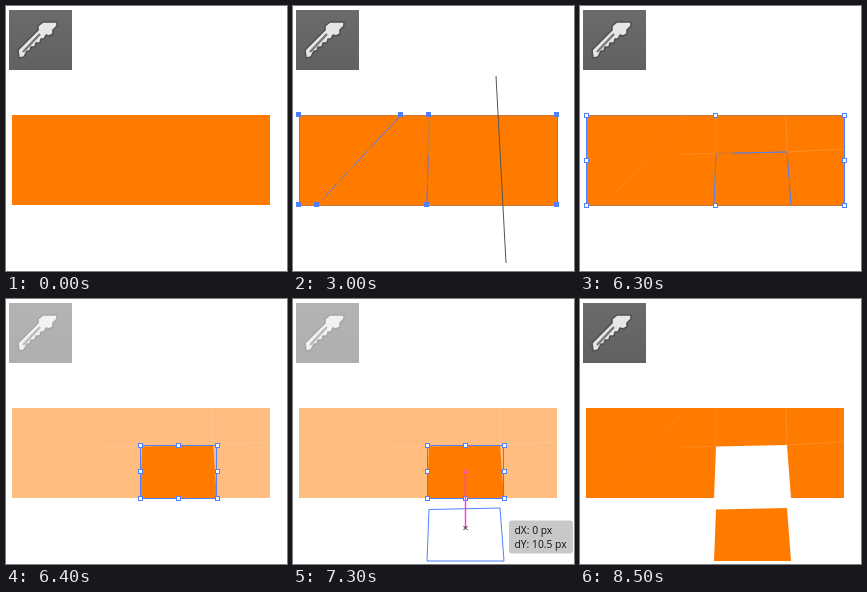
An HTML page for the animation above (9.1 s loop, 281 px wide and 265 px high).

```html
<!DOCTYPE html>
<html lang="en">
<head>
<meta charset="utf-8">
<title>Knife tool</title>
<style>
  html, body { margin: 0; width: 100%; height: 100%; overflow: hidden; background: #fff; }
  svg { display: block; width: 100%; height: 100%; }
  text { font: 10.3px "Open Sans", "Noto Sans", sans-serif; fill: #111; }
</style>
</head>
<body>
<svg id="stage" viewBox="0 0 281 265">
  <defs>
    <linearGradient id="panel" x1="0" y1="0" x2="0" y2="1">
      <stop offset="0" stop-color="#6b6b6b"/>
      <stop offset="1" stop-color="#616161"/>
    </linearGradient>
  </defs>
  <g id="icon">
    <rect x="3" y="4" width="63" height="60" fill="url(#panel)" shape-rendering="crispEdges"/>
    <g stroke-linejoin="round">
      <path id="knife" d="M37 16H51V20L47 24V28L43 30L40 29L38 33L35 33L34 37L30 37L29 41L25 41L24 45L21 45L18 51L13 52L12 44L32 24V20Z"
        fill="#e6e6e6" stroke="#505050" stroke-width="1.6"/>
      <path d="M17 46L34 28" fill="none" stroke="#777" stroke-width="2.4"/>
    </g>
  </g>
  <g id="art"></g>
  <g id="over"></g>
</svg>
<script>
const LOOP = 9100;
const ORANGE = '#ff7b00', PALE = '#ffbd80', BLUE = '#4f80ff', MUTED = '#c67a3c', PINK = '#ff3fd8';
const byId = id => document.getElementById(id);

// Cut points
const A = [108, 109], B = [24, 199], C = [136, 109], D = [134, 199], E = [206, 109], F = [211, 199];
const P = [71, 148], Q = [136, 147.5], R = [207, 146], L = [6, 148], M = [264, 143];
const BOX = [[6, 109], [264, 109], [264, 199], [6, 199]];
const PIECE = [Q, R, F, D];
const TOP_PIECE = [C, E, R, Q];
const RIGHT_PIECE = [R, M, [264, 199], F];

const shift = (pts, dy) => pts.map(([x, y]) => [x, y + dy]);
const mix = (a, b, k) => [a[0] + (b[0] - a[0]) * k, a[1] + (b[1] - a[1]) * k];
const poly = (pts, fill, stroke = 'none') =>
  `<polygon points="${pts.join(' ')}" fill="${fill}" stroke="${stroke}"/>`;
const line = (a, b, color, w = 1) =>
  `<path d="M${a}L${b}" fill="none" stroke="${color}" stroke-width="${w}"/>`;
const part = (a, b, from, to) => line(mix(a, b, from), mix(a, b, to), BLUE);
const rect = (x, y, w, h, fill, extra = '') =>
  `<rect x="${x}" y="${y}" width="${w}" height="${h}" fill="${fill}" ${extra}/>`;
const crisp = s => `<g shape-rendering="crispEdges">${s}</g>`;
const anchors = pts => crisp(pts.map(([x, y]) =>
  rect(Math.round(x) - 3, Math.round(y) - 3, 5, 5, BLUE)).join(''));

function frame() {
  return crisp(rect(6, 109, 258, 1, MUTED) + rect(6, 199, 259, 1, MUTED) +
    rect(6, 109, 1, 90, BLUE) + rect(264, 109, 1, 90, BLUE));
}

function handles(x0, y0, x1, y1) {
  const xs = [x0, Math.floor((x0 + x1) / 2), x1];
  const ys = [y0, Math.floor((y0 + y1) / 2), y1];
  let s = '';
  ys.forEach((y, j) => xs.forEach((x, i) => {
    if (i !== 1 || j !== 1) s += rect(x - 2, y - 2, 5, 5, '#fff', `stroke="${BLUE}"`);
  }));
  return s.replace(/ (x|y)="(\d+)"/g, (m, k, v) => ` ${k}="${+v + 0.5 - 0.5 * (k === 'w')}"`)
    .replace(/width="5" height="5"/g, 'width="4" height="4"');
}

// Thin blue outline with muted stretches where it runs along the pixels
function pieceGlow() {
  return line(Q, R, MUTED) + part(Q, R, 0.25, 1) + part(Q, D, 0, 1) +
    line(R, F, MUTED) + part(R, F, 0.05, 0.5) + part(R, F, 0.6, 1);
}

function cutLines(n) {
  let s = line(A, B, MUTED);
  s += n < 4
    ? part(A, B, 0, 0.36) + part(A, B, 0.4, 0.57) + part(A, B, 0.64, 0.72) + part(A, B, 0.77, 0.9)
    : part(A, B, 0, 0.43) + part(A, B, 0.58, 0.68) + part(A, B, 0.74, 0.88);
  let pts = [...BOX, A, B];
  if (n > 1) {
    s += line(C, D, MUTED) + part(C, D, 0.45, 0.72) + part(C, D, 0.78, 1);
    pts.push(C, D);
  }
  if (n > 2) {
    s += line(E, R, MUTED) + line(R, F, MUTED) + part(E, R, 0.45, 1) +
      part(R, F, 0.05, 0.45) + part(R, F, 0.6, 1);
    pts.push(E, F);
  }
  if (n > 3) {
    s += line(L, Q, MUTED) + line(Q, R, MUTED) + line(R, M, MUTED) +
      part(Q, R, 0.25, 0.7) + part(Q, R, 0.8, 1) + part(R, M, 0.1, 0.45) + part(R, M, 0.55, 0.9);
    pts.push(L, P, Q, R, M);
  }
  return frame() + s + anchors(pts);
}

function seams(dim) {
  const c = dim ? '#ffcb9b' : '#ff9230';
  return `<g opacity=".75">${line(mix(A, B, 0.04), mix(A, B, 0.9), c, dim ? 0.3 : 0.7)}` +
    line([97, 148], Q, c, 0.8) + line(C, Q, c, 0.6) + line(E, R, c) + line(R, M, c) + '</g>';
}

function tooltip(d) {
  const dy = d / 6, y = 158.5 + d;
  const label = `dY: ${dy.toFixed(1)} px`;
  const w = label.length > 10 ? 64 : 58;
  return rect(216, y, w, 33, '#c8c8c8', 'rx="3"') +
    `<text x="221.5" y="${y + 13}">dX: 0 px</text><text x="221.5" y="${y + 27}">${label}</text>`;
}

function cross(x, y, color) {
  return line([x - 2, y - 2], [x + 2, y + 2], color) + line([x - 2, y + 2], [x + 2, y - 2], color);
}

function dragView(d) {
  const end = 166 + d;
  const ghost = shift(PIECE, d);
  return poly(ghost, 'none', BLUE) +
    line([172.5, 172], [172.5, end], PINK, 1.5) + cross(172.5, 172.5, PINK) +
    cross(172.5, end, '#222') + tooltip(d);
}

const pieceBox = dy => crisp(rect(134.5, 146.5 + dy, 76, 53, 'none', `stroke="${BLUE}"`)) +
  handles(134, 146 + dy, 211, 199 + dy);

// Knife strokes: start time, path ends
const strokes = [
  [1100, [145, 70], [4, 219]],
  [2000, [138, 70], [132, 257]],
  [2800, [203, 70], [213, 257]],
  [4100, [3, 148], [280, 142.5]]
];
const cutTimes = [1400, 2300, 3100, 4500];
const drags = [21, 45, 54, 60, 63];

function overlay(t) {
  if (t < 5600) {
    const n = cutTimes.filter(c => t >= c).length;
    let s = n ? cutLines(n) : '';
    const k = strokes[n];
    if (k && t >= k[0]) {
      const step = Math.min(3, Math.floor((t - k[0]) / 100) + 1);
      s += line(k[1], mix(k[1], k[2], step / 3), '#555');
    }
    return s;
  }
  if (t < 6400) {
    const glow = t < 5800 ? '' : t < 6000 ? poly(RIGHT_PIECE, 'none', BLUE) : pieceGlow();
    return frame() + glow + handles(6, 109, 264, 199);
  }
  if (t < 7500) {
    const step = Math.min(4, Math.floor((t - 6900) / 100));
    return pieceBox(0) + (step < 0 ? '' : dragView(drags[step]));
  }
  if (t < 8100) {
    return (t < 7800 ? poly(shift(PIECE, 63), 'none', BLUE) : '') + pieceBox(63);
  }
  return t >= 8400 && t < 8500 ? poly(TOP_PIECE, 'none', BLUE) : '';
}

function artwork(t) {
  const dim = t >= 6400 && t < 8200;
  const moved = t >= 7500;
  let s = crisp(rect(6, 109, 258, 90, dim ? PALE : ORANGE));
  if (t >= 5600) s += seams(dim);
  if (moved) s += poly([Q, R, [211, 199.5], [134, 199.5]], '#fff');
  if (dim || moved) s += poly(shift(PIECE, moved ? 63 : 0), ORANGE);
  byId('icon').setAttribute('opacity', dim ? 0.5 : 1);
  return s;
}

let last = -1;
function draw(now) {
  const t = Math.floor((now % LOOP) / 100) * 100;
  if (t !== last) {
    last = t;
    byId('art').innerHTML = artwork(t);
    byId('over').innerHTML = overlay(t);
  }
  requestAnimationFrame(tick);
}
function tick() { draw(performance.now()); }
tick();
</script>
</body>
</html>
```
